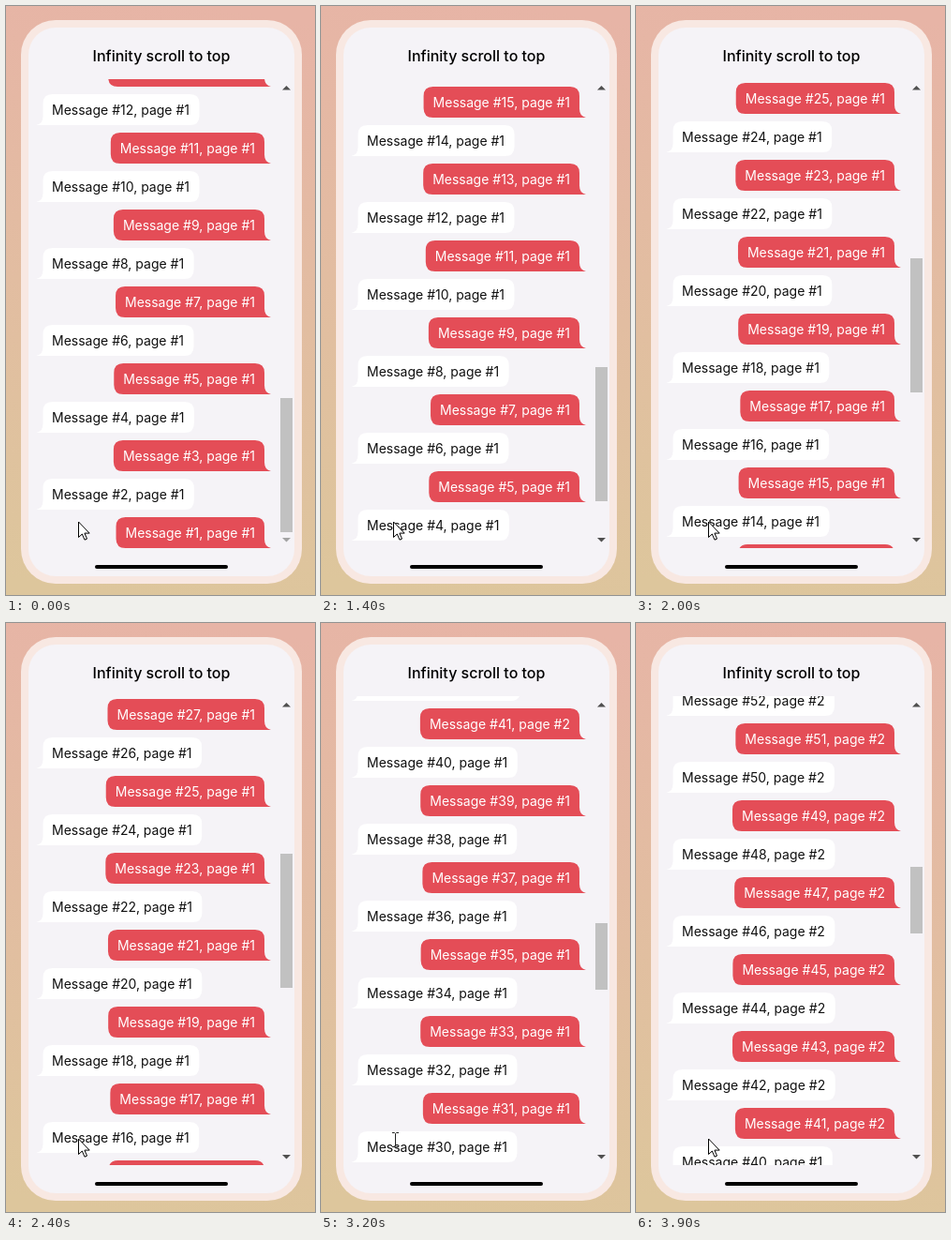
These frames come from a looping animation (330 px wide and 628 px high, 4 s). An HTML page:

```html
<!DOCTYPE html>
<html lang="en">
<head>
<meta charset="utf-8">
<title>Infinity scroll to top</title>
<style>
  html, body { margin: 0; width: 100%; height: 100%; overflow: hidden; }
  svg { display: block; width: 330px; height: 628px; font-family: Inter, sans-serif; }
  .msg { font-size: 14px; }
  .title { font-size: 16px; font-weight: 500; }
</style>
</head>
<body>
<svg viewBox="0 0 330 628">
  <defs>
    <linearGradient id="bg" gradientUnits="userSpaceOnUse" x1="215" y1="0" x2="115" y2="628">
      <stop offset="0" stop-color="#e7b4a6"/>
      <stop offset="1" stop-color="#ddc69c"/>
    </linearGradient>
    <clipPath id="view"><rect x="24" y="78" width="268" height="500"/></clipPath>
  </defs>
  <rect width="330" height="628" fill="url(#bg)"/>
  <rect x="16" y="15" width="300" height="601" rx="37" fill="#f8e8e2"/>
  <rect x="24" y="23" width="284" height="585" rx="29" fill="#f5f3f7"/>
  <text class="title" x="166" y="59" text-anchor="middle">Infinity scroll to top</text>
  <g clip-path="url(#view)"><g id="list"></g></g>
  <path d="M295 89.5L299.5 85L304 89.5Z" fill="#505050"/>
  <path id="down" d="M295 567L299.5 571.5L304 567Z"/>
  <rect id="thumb" x="293" width="13" fill="#c1c1c1"/>
  <rect x="95" y="596" width="142" height="4" rx="2"/>
  <path id="arrow" d="M77.5 550V566.5L81.3 563L84 569.2L86.5 568.1L83.9 562.1H89.2Z" fill="#fff" stroke="#000" stroke-linejoin="round"/>
  <path id="beam" d="M76 543.5H78.5L79.5 544.5L80.5 543.5H83M79.5 544.5V557.5M76 558.5H78.5L79.5 557.5L80.5 558.5H83" fill="none" stroke="#222"/>
</svg>
<script>
const LOOP = 4000, STEP = 100, ROW = 41, PER_PAGE = 40, COUNT = 56;
const VIEW = 500, TRACK = 469, TRACK_END = 561;
// [ms, scrolled px]
const KEYS = [
  [900, 0], [1000, 5], [1200, 38], [1400, 115], [1700, 325], [2000, 521],
  [2200, 587], [2400, 602], [2500, 650], [2650, 900], [2800, 1132], [2900, 1175],
  [3200, 1186], [3300, 1200], [3400, 1237], [3500, 1292], [3700, 1455], [3900, 1612]
];
const $ = id => document.getElementById(id);
const list = $('list'), rows = [];

function add(parent, tag, attrs) {
  const el = document.createElementNS('http://www.w3.org/2000/svg', tag);
  for (const k in attrs) el.setAttribute(k, attrs[k]);
  return parent.appendChild(el);
}

// Bubble with a tail at its lower outer corner; dir points to the tail.
function bubble(edge, dir, w) {
  const far = edge - dir * w, r = 10;
  return `M${edge - dir * r} -16.5Q${edge} -16.5 ${edge} ${r - 16.5}V7` +
    `Q${edge} 15 ${edge + dir * 7} 16.5H${far + dir * r}` +
    `Q${far} 16.5 ${far} ${16.5 - r}V${r - 16.5}Q${far} -16.5 ${far + dir * r} -16.5Z`;
}

function build() {
  for (let n = 1; n <= COUNT; n++) {
    const own = n % 2 === 1, g = add(list, 'g', {});
    const shape = add(g, 'path', { fill: own ? '#e44d57' : '#fff' });
    const text = add(g, 'text', {
      class: 'msg', x: own ? 266 : 49, y: 5,
      'text-anchor': own ? 'end' : 'start', fill: own ? '#fff' : '#111'
    });
    text.textContent = `Message #${n}, page #${Math.ceil(n / PER_PAGE)}`;
    const w = text.getComputedTextLength() + 20;
    shape.setAttribute('d', own ? bubble(276, 1, w) : bubble(39.5, -1, w));
    rows.push(g);
  }
}

// Monotone cubic interpolation through the keys
const slopes = KEYS.slice(1).map((k, i) => (k[1] - KEYS[i][1]) / (k[0] - KEYS[i][0]));
const tangents = KEYS.map((_, i) => {
  const a = slopes[i - 1] || 0, b = slopes[i] || 0;
  return a && b ? 2 * a * b / (a + b) : 0;
});

function scrollAt(t) {
  if (t <= KEYS[0][0]) return 0;
  let i = 0;
  while (i < KEYS.length - 2 && t > KEYS[i + 1][0]) i++;
  const [t0, a] = KEYS[i], [t1, b] = KEYS[i + 1], h = t1 - t0, u = (t - t0) / h;
  const ease = u * u * (3 - 2 * u);
  return a + (b - a) * ease + h * u * (1 - u) * (tangents[i] * (1 - u) - tangents[i + 1] * u);
}

function draw(ms) {
  const t = Math.floor(ms % LOOP / STEP) * STEP;
  const s = Math.round(scrollAt(t));
  const pages = s > 1130 ? 2 : 1;
  rows.forEach((g, i) => {
    const y = 561.5 - ROW * i + s;
    const shown = y > 50 && y < 610 && i < pages * PER_PAGE;
    g.setAttribute('display', shown ? 'inline' : 'none');
    g.setAttribute('transform', `translate(0 ${y})`);
  });
  const k = TRACK / (ROW * PER_PAGE * pages), size = Math.round(VIEW * k);
  $('thumb').setAttribute('height', size);
  $('thumb').setAttribute('y', Math.round(TRACK_END - s * k) - size);
  $('down').setAttribute('fill', s ? '#505050' : '#a3a3a3');
  const typing = t >= 2900 && t < 3700;
  $('arrow').setAttribute('display', typing ? 'none' : 'inline');
  $('beam').setAttribute('display', typing ? 'inline' : 'none');
}

build();
const start = performance.now();
function tick() {
  draw(performance.now() - start);
  requestAnimationFrame(tick);
}
draw(0);
requestAnimationFrame(tick);
</script>
</body>
</html>
```
